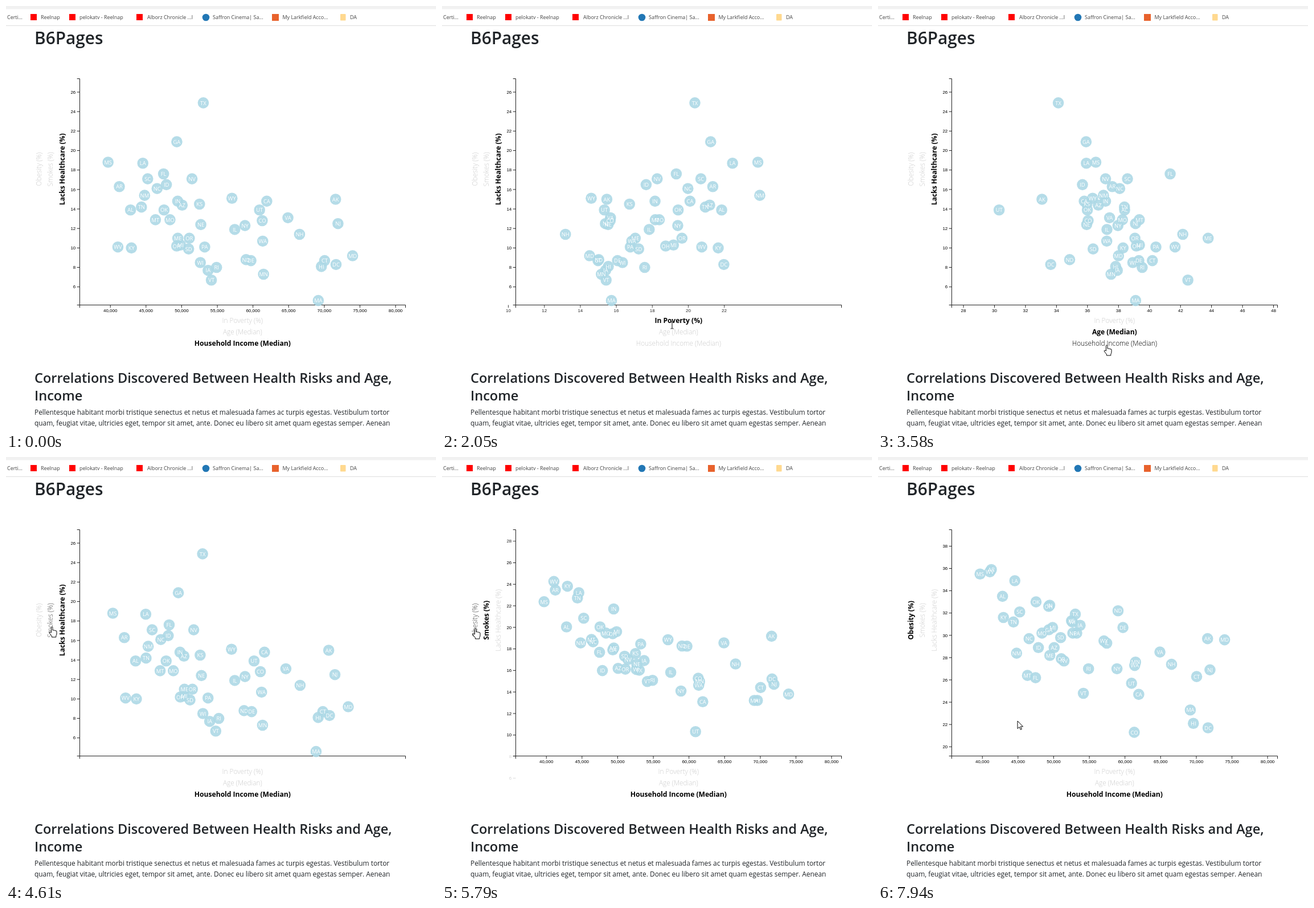
An HTML page for the animation above (8 s loop, 755 by 742 pixels).

```html
<!DOCTYPE html>
<html lang="en">
<head>
<meta charset="utf-8">
<title>Health risks</title>
<style>
html, body { margin: 0; width: 100%; height: 100%; overflow: hidden; background: #fff; }
svg { display: block; width: 100%; height: 100%; font-family: "Open Sans", "Noto Sans", sans-serif; }
.bar text { font-size: 8.95px; fill: #444; }
.page { fill: #212529; }
.page .big { font-size: 29.8px; font-weight: 600; }
.page .head { font-size: 23.6px; font-weight: 600; }
.page .body { font-size: 11.92px; }
.axis path, .axis line { fill: none; stroke: #222; }
.axis text { font: 8px "Liberation Sans", Arial, sans-serif; }
.dots circle { fill: #add8e6; opacity: .9; }
.dots text { font-size: 9.4px; fill: #fff; text-anchor: middle; }
.labels text { text-anchor: middle; }
.hand, .arrow { fill: #fff; stroke: #000; stroke-linejoin: round; }
.beam { fill: none; stroke: #000; }
</style>
</head>
<body>
<svg viewBox="0 0 755 742" preserveAspectRatio="none">
  <clipPath id="area"><rect x="33" y="80" width="702" height="553"/></clipPath>
  <g class="bar">
    <rect width="755" height="5.5" fill="#f1f1f1"/>
    <rect y="34" width="755" height="1" fill="#ddd"/>
    <rect x="43" y="14" width="11" height="11" fill="#f00"/>
    <rect x="111" y="14" width="11" height="11" fill="#f00"/>
    <rect x="229" y="14" width="11" height="11" fill="#f00"/>
    <circle cx="351" cy="20" r="6.3" fill="#2277b5"/>
    <rect x="467" y="14" width="12" height="12" fill="#e8622c"/>
    <rect x="587" y="14" width="9.5" height="11.5" rx="1" fill="#ffd98f"/>
    <text x="2" y="23">Certi...</text>
    <text x="61" y="23">Reelnap</text>
    <text x="129" y="23">pelokatv - Reelnap</text>
    <text x="248" y="23">Alborz Chronicle ...l</text>
    <text x="363" y="23">Saffron Cinema| Sa...</text>
    <text x="485.5" y="23">My Larkfield Acco...</text>
    <text x="604" y="23">DA</text>
  </g>
  <g class="page">
    <text class="big" x="50" y="67">B6Pages</text>
    <text class="head" x="50" y="661">Correlations Discovered Between Health Risks and Age,</text>
    <text class="head" x="50" y="691.5">Income</text>
    <text class="body" x="50" y="717">Pellentesque habitant morbi tristique senectus et netus et malesuada fames ac turpis egestas. Vestibulum tortor</text>
    <text class="body" x="50" y="735.5">quam, feugiat vitae, ultricies eget, tempor sit amet, ante. Donec eu libero sit amet quam egestas semper. Aenean</text>
  </g>
  <g clip-path="url(#area)">
    <g class="axis" id="axes"><path d="M124.7 127.5H129.5V524.5H124.7M129.5 529.3V524.5H701.5V529.3"/></g>
    <g class="dots" id="dots"></g>
    <g class="labels" id="labels"></g>
  </g>
  <path id="cursor"/>
</svg>
<script>
const states = ("AL AK AZ AR CA CO CT DE DC FL GA HI ID IL IN IA KS KY LA ME MD MA MI MN MS MO " +
  "MT NE NV NH NJ NM NY NC ND OH OK OR PA RI SC SD TN TX UT VT VA WA WV WI WY").split(" ");

// One value per state, in the order above
const income = [42830, 71583, 50068, 41262, 61933, 61303, 70048, 59716, 71648, 47463, 49321, 69592, 47861,
  57444, 49446, 53712, 52504, 42958, 44555, 49462, 73971, 69160, 49847, 61481, 39680, 48363,
  46328, 52686, 51450, 66532, 71919, 44803, 58878, 46556, 59029, 49308, 47529, 51075, 53234,
  54891, 45238, 50979, 44361, 53035, 60922, 54166, 64902, 61366, 41059, 52622, 57055];
const poverty = [19.3, 11.2, 18.2, 18.9, 16.4, 12, 10.8, 12.5, 17.7, 16.5, 18.3, 11.4, 14.8,
  14.4, 15.2, 12.2, 13.6, 19.1, 19.8, 14.1, 10.1, 11.6, 16.2, 11.5, 21.5, 15.5,
  15.4, 12.4, 15.2, 9.2, 11.1, 21.3, 15.9, 17.2, 11.5, 15.8, 16.6, 16.6, 13.6,
  14.3, 18, 14.2, 18.3, 17.2, 11.7, 12.2, 11.8, 13.2, 18.3, 13.2, 11.2];
const age = [38.6, 33.3, 36.9, 37.8, 36, 36.3, 40.5, 39.6, 33.8, 41.6, 36.1, 38.1, 35.9,
  37.5, 37.4, 38.2, 36.2, 38.5, 36.1, 44.1, 38.3, 39.4, 39.6, 37.8, 36.7, 38.5,
  39.6, 36.2, 37.4, 42.5, 39.4, 37.2, 38.2, 38.3, 35.1, 39.4, 36.2, 39.3, 40.7,
  39.8, 38.8, 36.6, 38.6, 34.3, 30.5, 42.8, 37.7, 37.5, 41.9, 39.2, 36.6];
const health = [13.9, 15, 14.4, 16.3, 14.8, 12.8, 8.7, 8.7, 8.3, 17.6, 20.9, 8.1, 16.5,
  11.9, 14.8, 7.7, 14.5, 10, 18.7, 11, 9.2, 4.6, 10.3, 7.3, 18.8, 12.9,
  12.9, 12.4, 17.1, 11.4, 12.5, 15.4, 12.3, 16.1, 8.8, 10.2, 13.9, 11, 10.1,
  8, 17.1, 9.9, 14.2, 24.9, 13.9, 6.7, 13.1, 10.7, 10.1, 8.5, 15.1];
const smokes = [21.1, 19.9, 16.5, 24.7, 12.8, 15.7, 15.4, 19.9, 16.4, 17.7, 17.4, 14.1, 15.9,
  16.5, 22.9, 18.5, 18.1, 26.2, 24, 19.3, 14.6, 14.7, 21.2, 16.3, 23, 20.6,
  19.9, 17.3, 17, 17.5, 15.1, 19.1, 14.4, 19.1, 19.9, 21, 21.1, 17, 19.9,
  16.3, 21.5, 18.6, 24.2, 14.5, 9.7, 16.4, 19.5, 15.3, 26.7, 17.4, 19.5];
const obesity = [33.5, 29.7, 28.9, 35.9, 24.7, 21.3, 26.3, 30.7, 21.7, 26.2, 30.5, 22.1, 28.9,
  29.3, 32.7, 30.9, 31.3, 31.6, 34.9, 28.2, 29.6, 23.3, 30.7, 27.6, 35.5, 30.2,
  26.4, 30.2, 27.7, 27.4, 26.9, 28.4, 27, 29.7, 32.2, 32.6, 33, 27.9, 30.2,
  27, 32.1, 29.8, 31.2, 31.9, 25.7, 24.8, 28.5, 27.3, 35.7, 31.2, 29.5];

const LOOP = 8000, DURATION = 1050, FADE = 300;
const CLICK = { poverty: 1353, age: 2662, income: 3790, smokes: 5102, obesity: 6410 };
const $ = id => document.getElementById(id);
const clamp = p => Math.max(0, Math.min(1, p));
const lerp = (a, b, p) => a + (b - a) * p;
const cubic = p => p < .5 ? 4 * p ** 3 : 1 - 4 * (1 - p) ** 3;

function add(parent, tag, attrs, text) {
  const el = document.createElementNS("http://www.w3.org/2000/svg", tag);
  for (const k in attrs) el.setAttribute(k, attrs[k]);
  if (text) el.textContent = text;
  return parent.appendChild(el);
}

function measure(values, start, end, step) {
  const lo = Math.min(...values) * .9, hi = Math.max(...values) * 1.1, ticks = new Set();
  for (let v = Math.ceil(lo / step) * step; v <= hi; v += step) ticks.add(v);
  return { values, ticks, at: v => lerp(start, end, (v - lo) / (hi - lo)) };
}
const across = (values, step) => measure(values, 129.5, 701.2, step);
const upward = values => measure(values, 524.5, 127.3, 2);

function makeAxis(steps, vertical) {
  const all = new Set(steps.flatMap(s => [...s.m.ticks]));
  const ticks = [...all].map(v => {
    const g = add($("axes"), "g");
    add(g, "line", vertical ? { x1: 124.7, x2: 129.5 } : { y1: 524.5, y2: 529.3 });
    add(g, "text", vertical ? { x: 122.3, y: 2.7, "text-anchor": "end" } : { y: 537.3, "text-anchor": "middle" },
      v.toLocaleString("en-US"));
    return { v, g };
  });
  return t => {
    const i = steps.findLastIndex(s => t >= s.start);
    const to = steps[i].m, from = steps[Math.max(0, i - 1)].m;
    const e = cubic(clamp((t - steps[i].start) / DURATION));
    const place = v => lerp(from.at(v), to.at(v), e);
    for (const { v, g } of ticks) {
      const pos = place(v);
      g.setAttribute("transform", vertical ? `translate(0 ${pos})` : `translate(${pos} 0)`);
      g.setAttribute("opacity", lerp(+from.ticks.has(v), +to.ticks.has(v), e));
    }
    return n => lerp(from.at(from.values[n]), to.at(to.values[n]), e);
  };
}
const xAxis = makeAxis([
  { start: -DURATION, m: across(income, 5000) },
  { start: CLICK.poverty, m: across(poverty, 2) },
  { start: CLICK.age, m: across(age, 2) },
  { start: CLICK.income, m: across(income, 5000) }
], false);
const yAxis = makeAxis([
  { start: -DURATION, m: upward(health) },
  { start: CLICK.smokes, m: upward(smokes) },
  { start: CLICK.obesity, m: upward(obesity) }
], true);

const circles = states.map(() => add($("dots"), "circle", { r: 9.8 }));
const names = states.map(s => add($("dots"), "text", {}, s));

// on: spans when selected; shade: [time, grey level faded to]
const labels = [
  { text: "In Poverty (%)", y: 556.3, on: [[CLICK.poverty, CLICK.age]], shade: [[880, 0], [CLICK.age, 204]] },
  { text: "Age (Median)", y: 576.2, on: [[CLICK.age, CLICK.income]], shade: [[2300, 0], [CLICK.income, 204]] },
  { text: "Household Income (Median)", y: 596, on: [[0, CLICK.poverty], [CLICK.income, LOOP]],
    shade: [[-FADE, 0], [CLICK.poverty, 204], [2960, 0]] },
  { text: "Obesity (%)", x: 62.3, on: [[CLICK.obesity, LOOP]], shade: [[5650, 0]] },
  { text: "Smokes (%)", x: 82.3, on: [[CLICK.smokes, CLICK.obesity]], shade: [[4490, 0], [CLICK.obesity, 204]] },
  { text: "Lacks Healthcare (%)", x: 102.6, on: [[0, CLICK.smokes]], shade: [[-FADE, 0], [CLICK.smokes, 204]] }
];
for (const l of labels) {
  const spot = l.x ? `translate(${l.x} 286.3) rotate(-90)` : `translate(415.3 ${l.y})`;
  l.el = add($("labels"), "text", { transform: spot }, l.text);
}

function drawLabel(l, t) {
  const active = l.on.some(([a, b]) => t >= a && t < b);
  let grey = 204;
  for (const [start, target] of l.shade)
    grey = lerp(grey, target, 1 - (1 - clamp((t - start) / FADE)) ** 1.7);
  l.el.setAttribute("fill", `rgb(${grey},${grey},${grey})`);
  l.el.setAttribute("font-weight", active ? 700 : 300);
  l.el.setAttribute("font-size", active ? 12.1 : 11.8);
}

const shapes = {
  arrow: "M0 0V13.5L3.2 10.6 5.3 15.3 7.4 14.4 5.3 9.9H9.6Z",
  hand: "M-1.6 10V1.4Q-1.6 0-.3 0T1 1.4V6Q2 5 3.4 6.3 4.8 5.4 6 6.9 8 6.2 8 8.2V12Q8 14 6.8 15.5V18H-.6V16L-4.6 11Q-5.4 9-3.6 9Z",
  beam: "M-2.5-6H-.6L0-5.4.6-6H2.5M0-5.4V5.4M-2.5 6H-.6L0 5.4.6 6H2.5"
};
const route = [[260, 600, 680], [1020, 404, 553], [1290, 404, 553], [1560, 404, 559], [2120, 404, 560],
  [2500, 405, 567], [2662, 405, 569], [2810, 405, 584], [3050, 402, 595], [3830, 402, 595], [4600, 81, 298],
  [5550, 79, 299], [5720, 59, 301], [6550, 59, 301], [7940, 245, 463]];
const looks = [[260, "arrow"], [880, "hand"], [CLICK.poverty, "beam"], [2300, "hand"], [CLICK.age, "beam"],
  [2750, "arrow"], [2960, "hand"], [CLICK.income, "beam"], [3900, "arrow"], [4490, "hand"],
  [CLICK.smokes, "beam"], [5650, "hand"], [CLICK.obesity, "beam"], [6720, "arrow"]];

function drawCursor(t) {
  const el = $("cursor"), look = looks.findLast(k => t >= k[0]);
  el.style.display = look ? "" : "none";
  if (!look) return;
  const i = route.findLastIndex(k => t >= k[0]);
  const a = route[i], b = route[i + 1] || a;
  const p = clamp((t - a[0]) / (b[0] - a[0] || 1)), e = p * p * (3 - 2 * p);
  el.setAttribute("class", look[1]);
  el.setAttribute("d", shapes[look[1]]);
  el.setAttribute("transform", `translate(${lerp(a[1], b[1], e)} ${lerp(a[2], b[2], e)})`);
}

function draw(t) {
  const x = xAxis(t), y = yAxis(t);
  states.forEach((_, n) => {
    circles[n].setAttribute("cx", x(n));
    circles[n].setAttribute("cy", y(n));
    names[n].setAttribute("x", x(n));
    names[n].setAttribute("y", y(n) + 3.7);
  });
  labels.forEach(l => drawLabel(l, t));
  drawCursor(t);
}

const begin = performance.now();
function frame() {
  draw((performance.now() - begin) % LOOP);
  requestAnimationFrame(frame);
}
frame();
</script>
</body>
</html>
```
